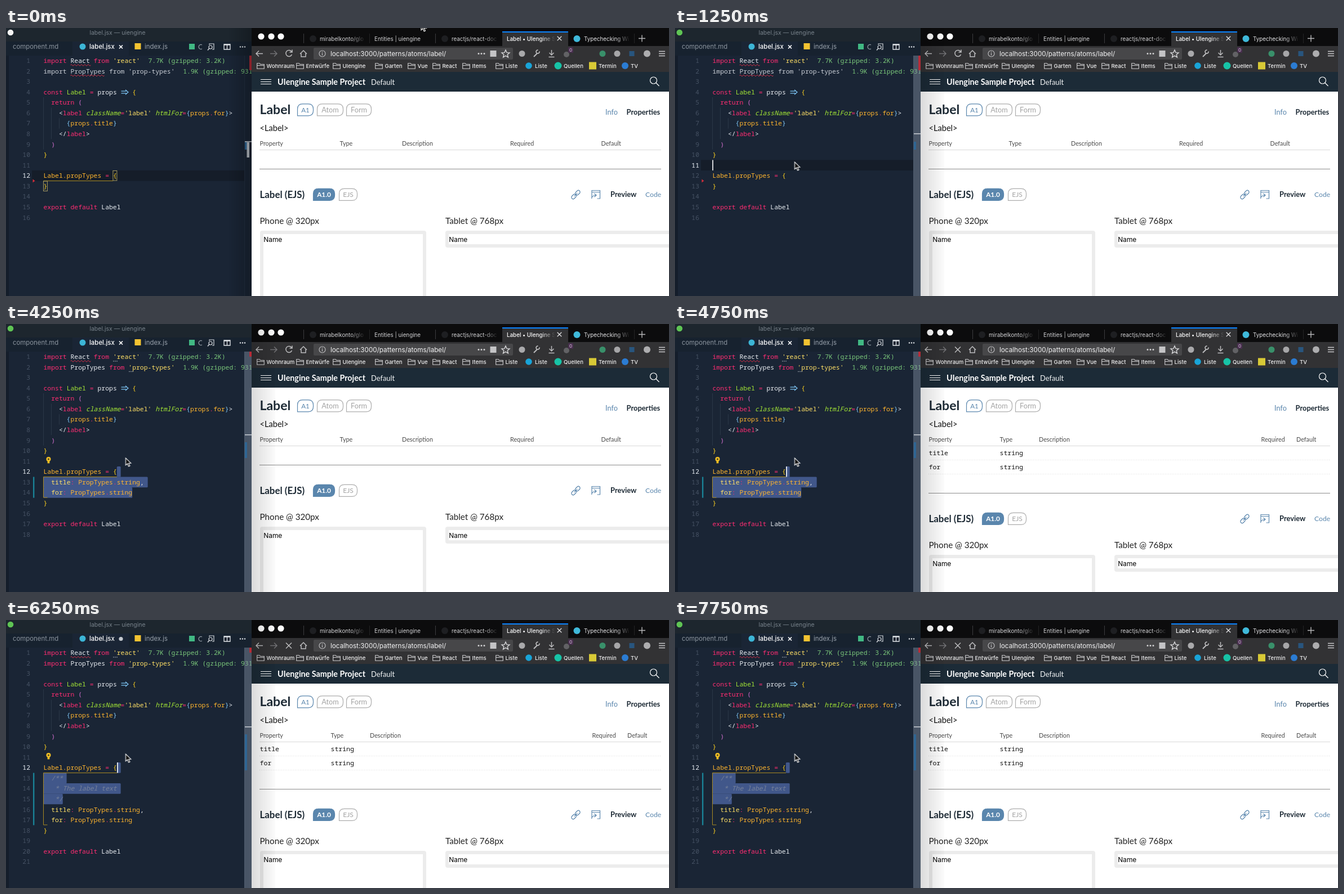
An HTML page that plays this animation: 1177 px wide and 476 px high, repeating every 8000 ms.

```html
<!DOCTYPE html>
<html lang="en">
<head>
<meta charset="utf-8">
<title>Label component</title>
<style>
  html, body { margin: 0; width: 100%; height: 100%; overflow: hidden; background: #1a2535; }
  svg { display: block; width: 1177px; height: 476px; }
  text { white-space: pre; }
  .ui { font-family: Inter, Roboto, sans-serif; }
  .page { font-family: Lato, "Open Sans", sans-serif; }
  .mono { font-family: "Noto Sans Mono", "DejaVu Sans Mono", monospace; font-weight: 500; }
  .b { font-weight: 700; }
  .m { font-weight: 500; }
  .i { font-style: italic; }
  .line { fill: none; stroke-width: 1.2; }
  #pointer { animation: move 8s step-end infinite; }
  @keyframes move {
    0% { transform: translate(737px, -9px); }
    3.125% { transform: translate(610px, 92px); }
    6.25% { transform: translate(330px, 212px); }
    9.375% { transform: translate(212.5px, 238px); }
  }
</style>
</head>
<body>
<script>
const LOOP = 8000, X0 = 66.5, CHAR = 6.858, ROW = 18.57;
const PASTE = 2750, SAVED = 3500, PASTE2 = 6250, SAVED2 = 6750, CLICK = 1250, LOADED = 4750;
const INK = {
  p: '#ff2d72', w: '#e9edf2', g: '#a3e635', y: '#ffe066', o: '#ffb52e', k: '#ffd21f',
  c: '#7fc8f8', v: '#d46fd0', n: '#7ac77a', z: '#c9ced6', q: '#77829a'
};

const rules = new Map();
// Shows a group between alternating on/off times (ms).
function during(times, svg) {
  const name = 'on' + times.join('_');
  const steps = times.map((t, i) => `${t / LOOP * 100}%{opacity:${1 - i % 2}}`).join('');
  rules.set(name, `@keyframes ${name}{${times[0] ? '0%{opacity:0}' : ''}${steps}}
    .${name}{animation:${name} ${LOOP}ms step-end infinite}`);
  return `<g class="${name}">${svg}</g>`;
}
const esc = s => String(s).replace(/&/g, '&amp;').replace(/</g, '&lt;');
const text = (x, y, s, size, fill, cls = 'ui', anchor = 'start') =>
  `<text x="${x}" y="${y}" font-size="${size}" fill="${fill}" class="${cls}" text-anchor="${anchor}">${esc(s)}</text>`;
const rect = (x, y, w, h, fill, r = 0) =>
  `<rect x="${x}" y="${y}" width="${w}" height="${h}" fill="${fill}" rx="${r}"/>`;
const dot = (x, y, r, fill) => `<circle cx="${x}" cy="${y}" r="${r}" fill="${fill}"/>`;
const ring = (x, y, r, color) => `<circle cx="${x}" cy="${y}" r="${r}" class="line" stroke="${color}"/>`;
const line = (d, color, w = 1.2) => `<path d="${d}" class="line" stroke="${color}" style="stroke-width:${w}"/>`;
const cross = (x, y, r, color, w = 1.5) =>
  line(`M${x - r} ${y - r}l${2 * r} ${2 * r}M${x + r} ${y - r}l${-2 * r} ${2 * r}`, color, w);

/* ---------- editor ---------- */
const base = n => 62 + ROW * (n - 1);
const rowTop = n => base(n) - 13.3;

// "~x" switches to ink x; a following "^" makes it italic, ink q always is.
function code(n, src) {
  const spans = src.split('~').slice(1).map(part => {
    const slanted = part[1] === '^';
    const cls = slanted || part[0] === 'q' ? 'i' : '';
    return `<tspan fill="${INK[part[0]]}" class="${cls}">${esc(part.slice(slanted ? 2 : 1))}</tspan>`;
  });
  return `<text x="${X0}" y="${base(n)}" font-size="11.43" class="mono">${spans.join('')}</text>`;
}
const lineNo = (n, fill = '#465264') => text(43, base(n), n, 11.4, fill, 'mono', 'end');
const numbers = (a, b) => Array.from({ length: b - a + 1 }, (_, i) => lineNo(a + i)).join('');
const squiggle = (x, y, w) => line(`M${x} ${y}` + 'q1.5 -2.6 3 0t3 0'.repeat(Math.round(w / 6)), '#e0324a', 1);
const select = (n, col, cols) => rect(X0 + col * CHAR, rowTop(n), cols * CHAR, ROW + .1, '#41578a', 1.5);
const caret = (x, n) => rect(x, rowTop(n), 1.6, ROW, '#fff');
const gold = n => line(`M197 271.5H66.5V${rowTop(n) - .5}h7`, '#a98a22', 1);
const marks = (y, top, h) => rect(424, top, 4, h, '#2f6593') + rect(424, y, 12, 1.6, '#c4c9d0');

const TITLE = '~w  ~ytitle~p: ~oPropTypes~p.~ostring~w,';
const FOR = '~w  ~yfor~p: ~oPropTypes~p.~ostring';
const EXPORT = '~pexport default ~wLabel';
const props = n => code(n, TITLE) + code(n + 1, FOR) + code(n + 2, '~k}') + code(n + 4, EXPORT);

function editorChrome() {
  return rect(0, 0, 436, 476, '#1a2535') + rect(0, 0, 436, 24, '#1d262e') + rect(0, 24, 436, 25, '#17222f')
    + rect(118, 24, 100, 25, '#1a2535') + rect(0, 49, 5, 427, '#141d2a')
    + during([0, CLICK], dot(8, 8, 5.3, '#f4f4f4')) + during([CLICK], dot(8, 8, 5.3, '#5fc454'))
    + text(198, 11.5, 'label.jsx — uiengine', 10.5, '#78828b', 'ui', 'middle')
    + text(12, 37.2, 'component.md', 11.4, '#8b949e')
    + dot(136, 33, 5.5, '#3cb5d6') + text(148, 37.2, 'label.jsx', 11.4, '#fff', 'ui m')
    + during([0, PASTE, SAVED, PASTE2, SAVED2], cross(204, 33.5, 3, '#fff', 1.7))
    + during([PASTE, SAVED, PASTE2, SAVED2], dot(204, 33.5, 3.6, '#c5cad0'))
    + rect(228.5, 27, 11, 11, '#f3c331') + text(246, 37.2, 'index.js', 11.4, '#98a1ab')
    + rect(325, 28, 10, 10, '#41b883')
    + line('M348 30a4 4 0 1 0 0 7', '#8f98a2', 1.3)
    + line('M361 30v-2h8v10h-3', '#d5d9de') + ring(363, 34, 3, '#d5d9de') + line('M361 36l-3 3.5', '#d5d9de', 1.5)
    + line('M387 29h11v9h-11zM392.5 29v9M387 30h11', '#e3e6ea', 1.3)
    + [416, 420, 424].map(x => dot(x, 33.5, 1.2, '#dfe3e7')).join('');
}

function editorBody() {
  const highlight = n => rect(46, rowTop(n), 377, ROW, '#151d29');
  const guides = line(`M66.5 ${rowTop(5)}V${rowTop(10)}M80.5 ${rowTop(6)}V${rowTop(9)}M94.5 ${rowTop(7)}V${rowTop(8)}`, '#2a3747', 1);
  const bulb = dot(75.5, 240, 4, '#f2bf24') + rect(73.6, 243, 3.8, 4.4, '#f2bf24') + dot(75.5, 240, 1.6, '#4b4424');
  const bracket = (col, n) => `<rect x="${X0 + col * CHAR}" y="${rowTop(n) + .5}" width="6.9" height="17.5" class="line" stroke="#a79c63" style="stroke-width:1"/>`;
  const size = (n, cols, s) => text(X0 + cols * CHAR + 14.5, base(n), s, 11.43, INK.n, 'mono');
  const red = h => rect(432, 49, 4, h, '#b52c38');
  const dots = (x, y) => [0, 3, 6].map(d => dot(x + d, y, .8, '#b9c0c9')).join('');
  return during([0, CLICK], highlight(12)) + during([CLICK, PASTE], highlight(11)) + guides
    + during([PASTE, PASTE2], select(12, 19, 1) + select(13, 0, 27) + select(14, 0, 23))
    + during([PASTE2], select(12, 19, 1) + select(13, 0, 6) + select(14, 0, 20) + select(15, 0, 5))
    + during([0, CLICK], line('M66.5 271.5H190', '#a98a22', 1) + bracket(18, 12) + bracket(0, 13))
    + during([PASTE, PASTE2], gold(15)) + during([PASTE2], gold(18))
    + numbers(1, 16) + during([PASTE], numbers(17, 18)) + during([PASTE2], numbers(19, 21))
    + during([0, CLICK, PASTE], lineNo(12, '#dfe4ea')) + during([CLICK, PASTE], lineNo(11, '#dfe4ea'))
    + during([0, SAVED], `<path d="M47.5 268.5l4 3-4 3z" fill="#d32f3c"/>`)
    + during([SAVED, PASTE2], rect(48, rowTop(13), 2.4, 2 * ROW, '#1a8296'))
    + during([PASTE2], rect(48, rowTop(13), 2.4, 5 * ROW, '#1a8296'))
    + code(1, "~pimport ~wReact ~pfrom ~y'react'") + size(1, 25, '7.7K (gzipped: 3.2K)')
    + during([0, SAVED], code(2, "~zimport PropTypes from 'prop-types'") + squiggle(114.5, 84.5, 62))
    + during([SAVED], code(2, "~pimport ~wPropTypes ~pfrom ~y'prop-types'"))
    + size(2, 34, '1.9K (gzipped: 931B)') + squiggle(114.5, 66, 34)
    + during([4000], dots(191, 66) + dots(219, 84.5))
    + code(4, '~pconst ~gLabel ~p= ~wprops    ~k{')
    + line('M204.5 112.2h9M204.5 115.8h9M212 109.8l5 4.2-5 4.2', INK.c, 1.2)
    + code(5, '~p  return ~v(')
    + code(6, "~w    <~plabel ~g^className~p=~y'label' ~g^htmlFor~p=~c{~oprops~p.~ofor~c}~w>")
    + code(7, '~c      {~oprops~p.~otitle~c}')
    + code(8, '~w    </~plabel~w>') + code(9, '~v  )') + code(10, '~k}')
    + code(12, '~oLabel.propTypes ~p= ~k{')
    + during([0, PASTE], code(13, '~k}') + code(15, EXPORT))
    + during([PASTE, PASTE2], props(13))
    + during([PASTE2], code(13, '~q  /**') + code(14, '~q   * The label text') + code(15, '~q   */') + props(16))
    + during([SAVED], bulb)
    + during([CLICK, 1750, 2250, PASTE], caret(66.3, 11))
    + during([PASTE, 3250, 3750, 4250, 4750, 5250, 5750, 6750, 7250, 7750], caret(197.2, 12))
    + line('M423.5 49V476', '#223040', 1)
    + during([500], `<g opacity=".45">${rect(423, 49, 13, 427, '#8390a3')}</g>`)
    + during([0, SAVED], red(26)) + during([SAVED], red(9))
    + during([0, CLICK], marks(201, 202, 14)) + during([CLICK, PASTE], marks(187, 202, 14))
    + during([PASTE, SAVED], marks(196, 197, 14)) + during([SAVED, PASTE2], marks(196, 210, 28))
    + during([PASTE2], marks(189, 203, 64))
    + during([0, 500], rect(427.5, 203, 4.5, 27, '#b6bcc4'));
}

/* ---------- browser ---------- */
function browserTabs() {
  const label = (x, s, fill = '#d2d2d4', cls = 'ui') => text(x, 22.5, s, 9.8, fill, cls);
  const fade = (x, id) => rect(x, 10, 26, 20, `url(#${id})`) + rect(x + 25.5, 10, 8, 20, id === 'dark' ? '#0c0c0d' : '#323234');
  return rect(436, 0, 741, 33, '#0c0c0d')
    + [453, 471, 488].map(x => dot(x, 15, 5.6, '#fdfdfd')).join('')
    + line('M528.5 10V27M645.5 10V27M762.5 10V27M1115.5 10V27', '#3c3c3e', 1)
    + dot(545, 19, 6, '#1e1f22') + label(557, 'mirabelkonto/glo') + fade(612, 'dark')
    + label(654, 'Entities | uiengine')
    + dot(779, 19, 6, '#1e1f22') + label(791, 'reactjs/react-doc') + fade(848, 'dark')
    + rect(881, 6, 117, 27, '#323234') + rect(881, 6, 117, 2, '#0a84ff')
    + label(889, 'Label • UIengine S', '#fff', 'ui m') + fade(949, 'tab') + cross(982.5, 18.5, 3.8, '#e2e2e4', 1.3)
    + dot(1013.5, 19, 6, '#3fb9da') + label(1026, 'Typechecking Wi', '#e4e4e6') + fade(1082, 'dark')
    + line('M1123 18.5h12M1129 12.5v12', '#b8b8ba', 1.4);
}

function browserBar() {
  const c = '#bcbcbe';
  return rect(436, 32, 741, 46, '#323234')
    + line('M456 45.5h-12m5-5l-5 5 5 5', c, 1.5) + line('M469 45.5h12m-5-5l5 5-5 5', '#717174', 1.5)
    + during([0, 4500], line('M507 42a5.5 5.5 0 1 0 .5 5M508 38.5v4.5h-4.5', c, 1.5))
    + during([4500], cross(502, 45.5, 5, c))
    + line('M522 46l6-6 6 6M524 45v6h8v-6', c, 1.5)
    + rect(546, 35, 354, 21, '#474749', 2)
    + ring(561.5, 45.5, 5.5, c) + line('M561.5 44.5v4M561.5 42v1.2', c, 1.3)
    + text(576, 49.7, 'localhost:3000/patterns/atoms/label/', 11.7, '#f3f3f4')
    + [839, 844, 849].map(x => dot(x, 45.5, 1.5, '#d0d0d2')).join('')
    + rect(859.5, 40, 11, 11, '#c4c4c6')
    + line('M887 39l2 4.6 5 .4-3.8 3.2 1.2 4.8-4.4-2.6-4.4 2.6 1.2-4.8-3.8-3.2 5-.4z', '#d8d8da', 1.4)
    + dot(916, 45.5, 5.5, '#a9a9ab')
    + line('M937 51l6-6', c, 2) + line('M947 41.5a3 3 0 1 1-2.5-2.3', c, 1.7)
    + line('M968.5 39v9m-4-4l4 4 4-4M963.5 51.5h10', c, 1.5)
    + dot(995, 47, 5, '#626265') + rect(998, 34, 9, 10, '#49304f', 1.5) + text(1002.5, 41.8, '0', 8, '#d9c5e0', 'ui', 'middle')
    + dot(1059, 45.5, 5.5, '#39906a') + dot(1085, 45.5, 5.5, '#a6a6a8')
    + rect(1106.5, 41, 9, 9, '#28557e') + dot(1138, 45.5, 6, '#adadaf')
    + line('M1159 41.5h11M1159 45.5h11M1159 49.5h11', '#c8c8ca', 1.4);
}

function bookmarks() {
  const name = (x, s) => text(x, 71, s, 9.6, '#f0f0f1', 'ui m');
  const folders = [[445, 'Wohnraum'], [515, 'Entwürfe'], [580, 'UIengine'], [655, 'Garten'], [713, 'Vue'],
    [757, 'React'], [810, 'Items'], [869, 'Liste']];
  const icon = x => line(`M${x + .7} 72.3v-9.6h4.5l1.5 1.8h6.6v7.8zM${x + .7} 66.5h12.6`, '#cfcfd1', 1.1);
  return folders.map(([x, s]) => icon(x) + name(x + 17.5, s)).join('')
    + dot(928, 67, 5.8, '#19a4d8') + name(939, 'Liste')
    + dot(980, 67, 6.5, '#17c3a6') + name(990, 'Quellen')
    + rect(1035, 60.5, 13, 13, '#d8c936') + name(1052, 'Termin')
    + dot(1099, 67, 6, '#2b7cd3') + name(1109, 'TV');
}

/* ---------- page ---------- */
const BLUE = '#5a86ad', DARK = '#1d2a35';
function badge(x, y, w, s, { border = '#adadad', fill = 'none', ink = '#a3a3a3', size = 12.7, cls = 'page' } = {}) {
  const h = 21, r = 9;
  return `<path d="M${x} ${y + h}V${y + r}q0 ${-r} ${r} ${-r}H${x + w - r}q${r} 0 ${r} ${r}V${y + h - r}q0 ${r} ${-r} ${r}Z" fill="${fill}" stroke="${border}" stroke-width="1.2"/>`
    + text(x + w / 2, y + 14.8, s, size, ink, cls, 'middle');
}

// Everything below the property table.
function previews() {
  const frame = (x, w, h) => rect(x, 360, w, h, '#ececec', 4) + rect(x + 6, 366, w - 12, h - 12, '#fff')
    + text(x + 6.3, 380.3, 'Name', 11.9, '#000');
  return line('M450 250.5H1163', '#8c8c8c', 1)
    + text(450.5, 301.5, 'Label (EJS)', 16.9, DARK, 'page b')
    + badge(545.5, 285.3, 38, 'A1.0', { border: BLUE, fill: BLUE, ink: '#fff', size: 11.8, cls: 'page b' })
    + badge(591.5, 285.3, 32, 'EJS', { size: 12 })
    + `<g transform="translate(1011.5 296) rotate(-45)" class="line" stroke="${BLUE}"><rect x="-9.5" y="-3" width="9.5" height="6" rx="3"/><rect x="0" y="-3" width="9.5" height="6" rx="3"/><path d="M-4 0h8"/></g>`
    + line('M1040 302.5v-14h14.5v14.5h-5M1040 291.5h14.5M1039.5 303q1-6 8-6m-3-3l3.5 3-3.5 3', BLUE)
    + text(1073, 300, 'Preview', 12.9, DARK, 'page b') + text(1135, 300, 'Code', 12.2, BLUE, 'page')
    + text(450.5, 348, 'Phone @ 320px', 15.2, '#222', 'page') + text(780, 348, 'Tablet @ 768px', 15.2, '#222', 'page')
    + frame(451, 295, 160) + frame(780, 420, 30);
}

function page() {
  const heads = xs => ['Property', 'Type', 'Description', 'Required', 'Default']
    .map((s, i) => text(xs[i], 209, s, 10.8, '#4a4a4a', 'page')).join('');
  const row = (y, name) => text(450.5, y, name, 11.5, '#111', 'mono') + text(576.5, y, 'string', 11.5, '#111', 'mono')
    + `<path d="M450 ${y + 8.5}H1163" stroke="#dcdcdc" stroke-dasharray="1 2"/>`;
  return rect(436, 78, 741, 398, '#fff') + rect(436, 78, 741, 35, '#1c2b37')
    + line('M452 91.5h19M452 95.5h19M452 99.5h19', '#fff')
    + text(482, 100.8, 'UIengine Sample Project', 14.3, '#fff', 'page b')
    + text(648, 100.8, 'Default', 12.9, '#f2f4f5', 'page')
    + ring(1149.5, 93, 6, '#fff') + line('M1154 97.5l5.5 5.5', '#fff', 1.3)
    + text(450.5, 152.5, 'Label', 23, DARK, 'page b')
    + badge(517.5, 134.8, 28, 'A1', { border: BLUE, ink: BLUE, size: 11.6 })
    + badge(552.5, 134.8, 46, 'Atom') + badge(604.5, 134.8, 44, 'Form')
    + text(1064, 153.5, 'Info', 12.7, BLUE, 'page') + text(1101.5, 153.5, 'Properties', 12.9, DARK, 'page b')
    + text(450.5, 182.5, '<Label>', 14.6, '#111', 'page')
    + line('M450 216.5H1163', '#d9d9d9', 1)
    + during([0, LOADED], heads([450.5, 592.5, 703, 895, 1056.5]) + previews())
    + during([LOADED], heads([450.5, 576.5, 646, 1040.5, 1103]) + row(233, 'title') + row(258, 'for')
      + `<g transform="translate(0 50)">${previews()}</g>`);
}

/* ---------- stage ---------- */
const gradient = (id, c, a, b) => `<linearGradient id="${id}"><stop stop-color="${c}" stop-opacity="${a}"/><stop offset="1" stop-color="${c}" stop-opacity="${b}"/></linearGradient>`;
const scene = `<defs>${gradient('dark', '#0c0c0d', 0, 1)}${gradient('tab', '#323234', 0, 1)}
  ${gradient('left', '#000', 0, .25)}${gradient('right', '#000', .14, .015)}</defs>`
  + editorChrome() + editorBody()
  + during([0, CLICK], rect(396, 0, 40, 476, 'url(#left)'))
  + page() + browserTabs() + browserBar() + bookmarks()
  + during([CLICK], rect(436, 0, 42, 476, 'url(#right)'))
  + `<path id="pointer" d="M0 0V12.8L3 10L5.2 15L7.4 14L5.2 9.2H9.3Z" fill="#111" stroke="#fff" stroke-width="1.1"/>`;

document.body.innerHTML = `<style>${[...rules.values()].join('')}</style>
  <svg viewBox="0 0 1177 476">${scene}</svg>`;
</script>
</body>
</html>
```
